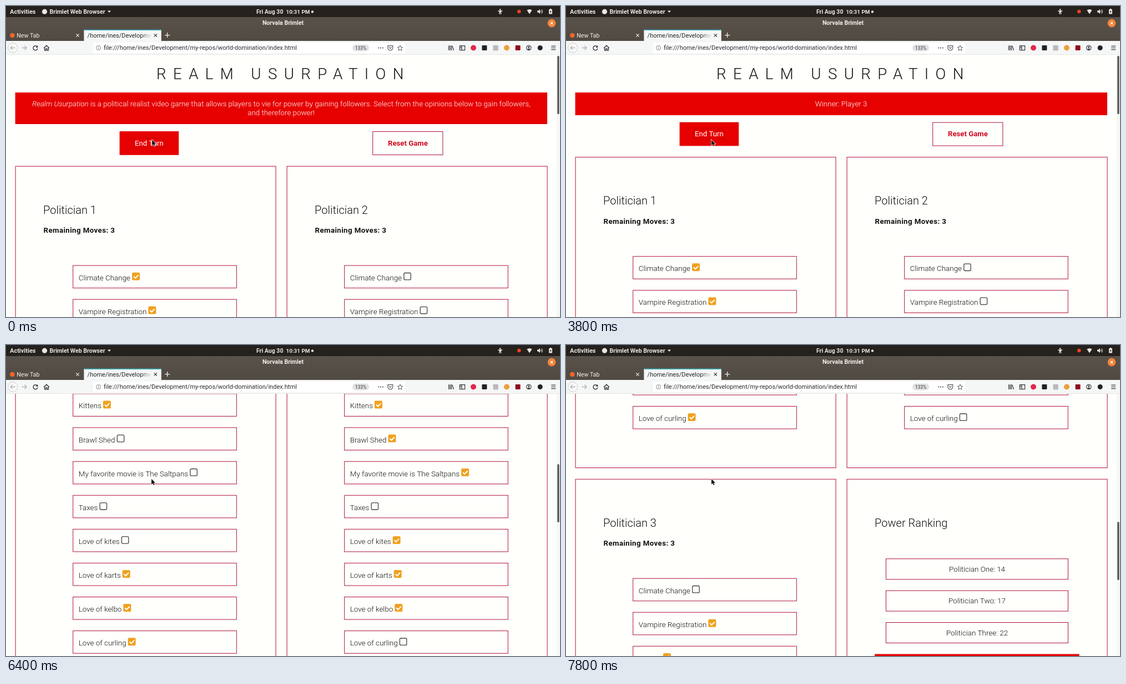
Recreate the animation shown at these times as an HTML page with a canvas. Size 998 by 561 pixels, loop 8 s.

```html
<!DOCTYPE html>
<html lang="en">
<head>
<meta charset="utf-8">
<title>Realm Usurpation</title>
<style>
html, body { margin: 0; width: 100%; height: 100%; overflow: hidden; background: #fffffc; }
canvas { display: block; width: 998px; height: 561px; }
</style>
</head>
<body>
<canvas id="stage" width="998" height="561"></canvas>
<script>
const ctx = document.getElementById('stage').getContext('2d');
const LOOP = 8000;
const RED = '#e60000', LINE = '#b0123a', INK = '#111', ORANGE = '#f0a11f', PAPER = '#fffffc';

const PANEL_W = 469, PANEL_H = 839.8, LEFT = 17.1, RIGHT = 506.1;
const ROW = 61.1, LOWER = 860.4;
const opinions = ['Climate Change', 'Vampire Registration', 'Kittens', 'Brawl Shed',
  'My favorite movie is The Saltpans', 'Taxes', 'Love of kites', 'Love of karts',
  'Love of kelbo', 'Love of curling'];

// [time, scroll offset], held until the next entry
const scrollSteps = [[0, 0], [5800, 90], [6000, 240], [6200, 400], [6400, 486], [6600, 487],
  [6800, 640], [7000, 730], [7400, 802], [7600, 852], [7800, 891]];
const WIN_AT = 3800, NUDGE_AT = 2200;

const font = (weight, size) => `${weight} ${size}px Roboto, sans-serif`;

function text(str, x, y, weight, size, color, align = 'left', spacing = 0) {
  ctx.font = font(weight, size);
  ctx.fillStyle = color;
  ctx.textAlign = align;
  ctx.letterSpacing = spacing + 'px';
  ctx.fillText(str, x, y);
  const width = ctx.measureText(str).width;
  ctx.letterSpacing = '0px';
  return width;
}

function rect(x, y, w, h, color) {
  ctx.fillStyle = color;
  ctx.fillRect(x, y, w, h);
}

function frame(x, y, w, h) {
  ctx.strokeStyle = LINE;
  ctx.lineWidth = 1;
  ctx.strokeRect(x, y, w, h);
}

function round(x, y, w, h, r, color) {
  ctx.beginPath();
  ctx.roundRect(x, y, w, h, r);
  ctx.fillStyle = color;
  ctx.fill();
}

function dot(x, y, r, color) {
  ctx.beginPath();
  ctx.arc(x, y, r, 0, Math.PI * 2);
  ctx.fillStyle = color;
  ctx.fill();
}

function ring(x, y, r, color, width = 1) {
  ctx.beginPath();
  ctx.arc(x, y, r, 0, Math.PI * 2);
  ctx.strokeStyle = color;
  ctx.lineWidth = width;
  ctx.stroke();
}

function line(d, x, y, color, width = 1.2) {
  ctx.save();
  ctx.translate(x, y);
  ctx.strokeStyle = color;
  ctx.lineWidth = width;
  ctx.stroke(new Path2D(d));
  ctx.restore();
}

function shape(d, x, y, color) {
  ctx.save();
  ctx.translate(x, y);
  ctx.fillStyle = color;
  ctx.fill(new Path2D(d));
  ctx.restore();
}

function checkbox(x, y, checked) {
  if (checked) {
    round(x, y, 14, 14, 2.2, ORANGE);
    line('M3 7.2 L6 10.2 L11.3 4.6', x, y, '#fff', 2);
    return;
  }
  ctx.beginPath();
  ctx.roundRect(x + .8, y + .8, 12.4, 12.4, 2);
  ctx.strokeStyle = '#444';
  ctx.lineWidth = 1.3;
  ctx.stroke();
}

function politician(x, y, name, marks) {
  frame(x, y, PANEL_W, PANEL_H);
  text(name, x + 50, y + 85.7, 300, 20, INK);
  text('Remaining Moves: 3', x + 50.4, y + 120.3, 700, 13.3, INK, 'left', .4);
  opinions.forEach((opinion, i) => {
    const top = y + 179 + i * ROW;
    if (top > 561 || top < 40) return;
    frame(x + 103.6, top, 294.6, 40.6);
    const w = text(opinion, x + 113.7, top + 26.5, 300, 13.4, INK);
    checkbox(x + 116.7 + w, top + 12.6, marks[i] === '1');
  });
}

function ranking(x, y) {
  frame(x, y, PANEL_W, PANEL_H);
  text('Power Ranking', x + 50, y + 85.7, 300, 20, INK);
  ['One: 14', 'Two: 17', 'Three: 22'].forEach((score, i) => {
    const top = y + 143.6 + i * 57.4;
    frame(x + 70.4, top, 328, 37);
    text('Politician ' + score, x + 234.4, top + 23, 300, 13.4, INK, 'center');
  });
  rect(x + 50, y + 315.4, 368.5, 100, RED);
}

function banner(y, won) {
  rect(16.6, y, 958.4, won ? 41 : 57, RED);
  if (won) {
    text('Winner: Player 3', 495.6, y + 25, 300, 13.35, '#fff', 'center');
    return;
  }
  const name = 'Realm Usurpation';
  const rest = ' is a political realist video game that allows players to vie for power by gaining' +
    ' followers. Select from the opinions below to gain followers,';
  ctx.font = font('italic 300', 13.35);
  const nameW = ctx.measureText(name).width;
  ctx.font = font(300, 13.35);
  const x = 495.8 - (nameW + ctx.measureText(rest).width) / 2;
  text(name, x, y + 25, 'italic 300', 13.35, '#fff');
  text(rest, x + nameW, y + 25, 300, 13.35, '#fff');
  text('and therefore power!', 495.6, y + 41, 300, 13.35, '#fff', 'center');
}

function buttons(y) {
  rect(204.6, y, 106.6, 42.8, RED);
  ctx.setLineDash([1, 1]);
  ctx.strokeStyle = 'rgba(90,0,0,.45)';
  ctx.lineWidth = .8;
  ctx.strokeRect(230.5, y + 12.5, 55, 17);
  ctx.setLineDash([]);
  text('End Turn', 257.8, y + 25.7, 400, 13.2, '#fff', 'center');
  frame(660.7, y + .5, 126.2, 42);
  text('Reset Game', 723.9, y + 25.7, 700, 13.2, '#cf0a20', 'center');
}

function page(scroll, won) {
  const shift = won ? -16.4 : 0;
  ctx.save();
  ctx.beginPath();
  ctx.rect(0, 88, 998, 473);
  ctx.clip();
  rect(0, 88, 998, 473, PAPER);
  ctx.translate(0, -scroll);
  text('REALM USURPATION', 271, 131.7, 300, 27.7, INK, 'left', 12.4);
  banner(156, won);
  buttons(226 + shift);
  ctx.translate(0, scroll);
  const top = 289.1 + shift - scroll;
  politician(LEFT, top, 'Politician 1', '1110000111');
  politician(RIGHT, top, 'Politician 2', '0011101110');
  politician(LEFT, top + LOWER, 'Politician 3', '0110111111');
  ranking(RIGHT, top + LOWER);
  rect(992, 88, 6, 473, '#f7f7f5');
  round(993.2, 90 + scroll * .257, 3.4, 105, 1.6, '#575757');
  ctx.restore();
}

function systemBar() {
  const pale = '#e9e6e1';
  rect(0, 0, 998, 20, '#25211c');
  text('Activities', 7, 14, 700, 11, pale);
  dot(69.5, 10.2, 4.6, pale);
  text('Brimlet Web Browser', 78.5, 14, 700, 10.6, pale);
  shape('M0 0 H6 L3 3.4 Z', 183, 8.6, pale);
  text('Fri Aug 30', 451, 14, 700, 10.5, pale);
  text('10:31 PM', 504.5, 14, 700, 9.9, pale);
  dot(552, 10.4, 2.2, pale);
  dot(890.3, 6.6, 1.4, pale);
  line('M-4 0 H4 M0 0 V3 M-1.2 0 V6 M1.2 0 V6', 890.3, 9, pale, 1.3);
  dot(924.3, 10, 3.3, '#e8421f');
  shape('M-4.6 -2.6 Q0 -6 4.6 -2.6 L0 4.4 Z', 943, 10.2, pale);
  shape('M-5 -1.6 H-3 L0 -4.2 V4.2 L-3 1.6 H-5 Z', 962, 10, pale);
  line('M1.6 -2 Q3 0 1.6 2 M3.2 -3.8 Q6 0 3.2 3.8', 962, 10, pale, 1);
  round(978, 6, 6, 8.6, 1, pale);
  rect(979.8, 4.8, 2.4, 1.5, pale);
  shape('M.8 -2.6 L-1.8 .6 H0 L-.6 2.8 L1.8 -.6 H.2 Z', 981, 10.4, '#25211c');
}

function tabs() {
  const fade = ctx.createLinearGradient(0, 20, 0, 63);
  fade.addColorStop(0, '#59524b');
  fade.addColorStop(1, '#514a43');
  rect(0, 20, 998, 43, fade);
  text('Norvala Brimlet', 499, 34.4, 700, 10.6, '#f1eeea', 'center');
  dot(983, 31, 7.4, '#f08437');
  line('M-2.3 -2.3 L2.3 2.3 M2.3 -2.3 L-2.3 2.3', 983, 31, '#fff', 1.2);

  const cross = 'M-2.6 -2.6 L2.6 2.6 M2.6 -2.6 L-2.6 2.6';
  dot(11.3, 53, 4.3, '#f0662a');
  text('New Tab', 19.3, 56.8, 400, 10.6, '#f1eeea');
  line(cross, 129, 53, '#e9e6e1');

  rect(140.4, 43, 139.4, 20, '#f5f6f6');
  rect(140.4, 42.6, 139.4, 1.5, '#3fb7c3');
  ctx.save();
  ctx.beginPath();
  ctx.rect(141, 44, 121, 19);
  ctx.clip();
  text('/home/ines/Development', 146.6, 56.8, 400, 11, '#26262a');
  const mask = ctx.createLinearGradient(244, 0, 262, 0);
  mask.addColorStop(0, 'rgba(245,246,246,0)');
  mask.addColorStop(1, 'rgba(245,246,246,1)');
  rect(244, 45, 18, 18, mask);
  ctx.restore();
  line(cross, 269.4, 53, '#333');
  line('M-4.5 0 H4.5 M0 -4.5 V4.5', 290.6, 52.6, '#f1eeea', 1.3);
}

function toolbar() {
  const ink = '#38383d', faint = '#b4b4b6';
  rect(0, 63, 998, 25, '#f5f6f6');
  rect(0, 87.4, 998, .6, '#dededd');
  round(157, 66, 562, 19, 2, '#fff');

  dot(12.2, 75.5, 8.6, '#fafafa');
  ring(12.2, 75.5, 8.6, '#c4c4c5', .9);
  line('M4.5 0 H-4 M-.4 -3.8 L-4.2 0 L-.4 3.8', 12.2, 75.5, faint, 1.3);
  line('M-4.5 0 H4 M.4 -3.8 L4.2 0 L.4 3.8', 33, 75.5, faint, 1.3);
  line('M3.2 -2.4 A4 4 0 1 0 4 1', 53, 75.6, ink, 1.4);
  shape('M4.4 -4.6 V-.6 H.4 Z', 53, 75.6, ink);
  line('M-5 .4 L0 -4.4 L5 .4 M-3.4 -.6 V4.4 H-1 V1.2 H1 V4.4 H3.4 V-.6', 73, 75.6, ink, 1.3);

  ring(166.6, 75.5, 4, '#77777a', .9);
  rect(166.1, 74.8, 1, 3, '#77777a');
  rect(166.1, 73, 1, 1, '#77777a');
  text('file:///home/ines/Development/my-repos/world-domination/index.html',
    176, 79.2, 400, 11.07, '#2c2c30');
  round(624, 69.6, 30, 11.8, 5.9, '#e1e1e2');
  text('133%', 639, 78.6, 400, 8.4, '#38383d', 'center');
  for (let i = -1; i < 2; i++) dot(675 + i * 3.8, 75.6, 1.1, '#55555a');
  line('M-4.4 -4 H4.4 V0 A4.4 4.4 0 0 1 -4.4 0 Z M-2.2 -1.2 L0 1 L2.2 -1.2', 692.3, 75.6, '#55555a', 1.2);
  line('M0 -4.8 L1.4 -1.6 L4.8 -1.3 L2.2 1 L3 4.4 L0 2.6 L-3 4.4 L-2.2 1 L-4.8 -1.3 L-1.4 -1.6 Z',
    710, 75.8, '#55555a', 1);

  line('M-4 -4.4 V4.4 M-1.6 -4.4 V4.4 M.8 -4.4 V4.4 M2.2 -4 L4.8 4.4', 801.6, 75.6, ink, 1.3);
  line('M-4.6 -4 H4.6 V4 H-4.6 Z M-1 -4 V4 M-3.6 -1.8 H-2 M-3.6 .2 H-2', 822, 75.6, ink, 1.2);
  dot(842, 75.5, 5, '#e2264d');
  round(857.4, 71, 9, 9, 1, '#222');
  round(877.4, 70.8, 9.4, 9.6, 1.5, '#b9b9b9');
  dot(902, 75.5, 5, '#eda03a');
  round(917.6, 71, 9, 9, 1, '#8e0d1c');
  ring(941.8, 75.5, 4.2, ink, 1.2);
  dot(941.8, 74.2, 1.5, ink);
  shape('M-2.6 2.4 Q0 -.2 2.6 2.4 Q0 4.6 -2.6 2.4 Z', 941.8, 75.5, ink);
  dot(962.2, 75.5, 4.5, '#222');
  line('M-4 -3.2 H4 M0 0 M-4 0 H4 M-4 3.2 H4', 986.2, 75.5, ink, 1.2);
}

function cursor(x, y) {
  const arrow = 'M0 0 V10 L2.3 7.9 L3.8 11.4 L5.5 10.7 L4 7.3 H7 Z';
  line(arrow, x, y, 'rgba(255,255,255,.85)', 1.5);
  shape(arrow, x, y, '#151515');
}

function draw(t) {
  const scroll = scrollSteps.filter(step => step[0] <= t).pop()[1];
  ctx.clearRect(0, 0, 998, 561);
  page(scroll, t >= WIN_AT);
  systemBar();
  tabs();
  toolbar();
  cursor(t < NUDGE_AT ? 263.2 : 262, 241.4);
}

const start = performance.now();
function tick() {
  draw((performance.now() - start) % LOOP);
  requestAnimationFrame(tick);
}
tick();
</script>
</body>
</html>
```
